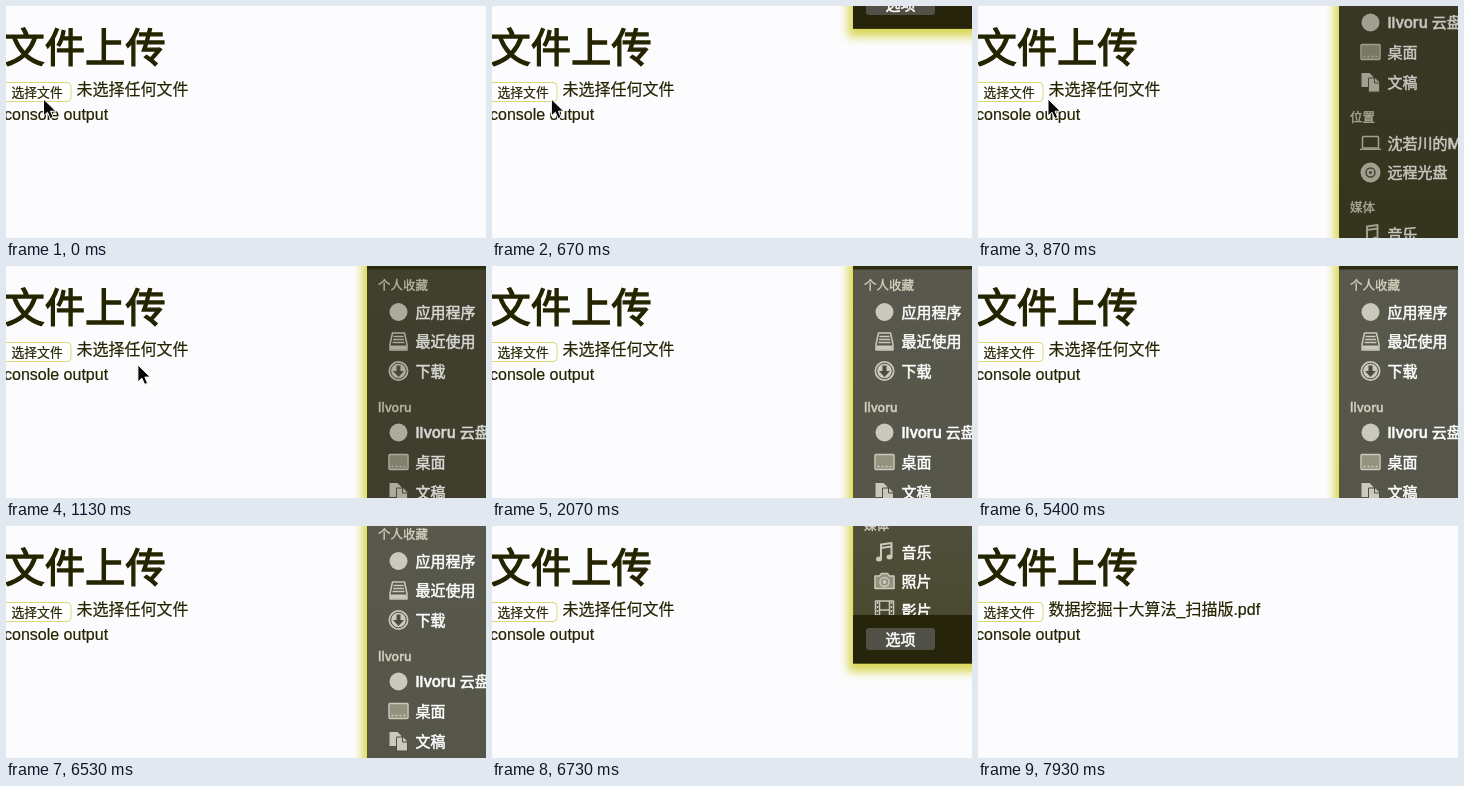
Write an HTML page that moves like this. It is 480 px wide and 232 px high and loops after 8 s.

```html
<!DOCTYPE html>
<html lang="zh-CN">
<head>
<meta charset="utf-8">
<style>
html, body { margin: 0; width: 100%; height: 100%; overflow: hidden; background: #fcfcfe; }
svg { display: block; width: 480px; height: 232px; }
text { font-family: "Liberation Sans", "Noto Sans CJK SC", "Noto Sans CJK", sans-serif; font-size: 16px; fill: #242400; stroke: #242400; stroke-width: .2px; white-space: pre; }
#title { font-size: 40.3px; stroke-width: 1.3px; }
#choose { font-size: 12.8px; }
#panel text { font-family: Inter, "Noto Sans CJK SC", "Noto Sans CJK", sans-serif; font-size: 15px; font-weight: 500; fill: #fff; stroke: #fff; stroke-width: .5px; }
#panel .head { font-size: 12.5px; fill: #d4d4c0; stroke: #d4d4c0; stroke-width: .35px; }
.line { fill: none; stroke: #c9c9bc; stroke-width: 1.5; stroke-linejoin: round; }
.solid { fill: #c9c9bc; }
.soft { fill: #92927e; }
.dark { fill: #4c4c40; }
.cut { fill: none; stroke: #4c4c40; stroke-width: 1.5; }
</style>
</head>
<body>
<svg viewBox="0 0 480 232">
  <defs>
    <filter id="blur" filterUnits="userSpaceOnUse" x="320" y="-60" width="260" height="620">
      <feGaussianBlur stdDeviation="5"/>
    </filter>
    <linearGradient id="shade" x2="0" y2="1">
      <stop stop-color="#58584c"/><stop offset=".5" stop-color="#55554a"/><stop offset="1" stop-color="#48462a"/>
    </linearGradient>
  </defs>
  <rect width="480" height="232" fill="#fcfcfe"/>
  <text id="title" x="-1.5" y="56">文件上传</text>
  <rect x="-4" y="76.5" width="69" height="19" rx="4" fill="#fff" stroke="#d8d878"/>
  <text id="choose" x="5.5" y="91">选择文件</text>
  <text id="file" x="70.5" y="89"></text>
  <text x="-2" y="114">console output</text>

  <g id="panel">
    <rect x="356" y="-10" width="170" height="508" fill="#c4c400" opacity=".65" filter="url(#blur)"/>
    <rect x="361.5" y=".5" width="160" height="489" fill="url(#shade)" stroke="#5c5c18"/>
    <rect id="dim" x="361" width="160" height="490" fill="#25230a"/>
    <g id="rows"></g>
    <rect x="361" width="160" height="3.5" fill="#2c2c10"/>
    <rect x="361" y="441" width="160" height="48" fill="#26240a"/>
    <rect x="374" y="454" width="69" height="22" rx="3" fill="#505046"/>
    <text x="393.5" y="471">选项</text>
  </g>
  <path id="pointer" d="M0 0V17L4 13.3L6.8 19.6L9.7 18.3L7 12.2H12.4Z" fill="#080808" stroke="#fff"/>
</svg>
<script>
const LOOP = 8000, HEIGHT = 489;
const $ = id => document.getElementById(id);

// Each icon is drawn around its own centre.
const icons = {
  disc: '<circle class="solid" r="9"/>',
  tray: '<path class="line" d="M-6-8.5H6L8.5 3V8.5H-8.5V3Z"/><path class="line" d="M-5-5H5M-5.5-2H5.5M-6 1H6"/><path class="solid" d="M-8 4H8V8H-8Z"/>',
  down: '<circle class="solid" r="10"/><circle class="cut" r="7.8" style="stroke-width:1"/><path class="dark" d="M-2-5.5H2V0H5.5L0 6L-5.5 0H-2Z"/>',
  desk: '<rect class="soft" x="-9" y="-7" width="18" height="14"/><rect class="line" x="-9.5" y="-7.5" width="19" height="15" rx="1"/><path class="line" d="M-7 4.5H7" stroke-dasharray="2 2"/>',
  docs: '<path class="solid" d="M-9-9H-1L3-5V5H-9Z"/><path class="solid" d="M-2-4H5L9 0V10H-2Z" stroke="#4c4c40"/><path class="cut" d="M4-4V1H9" style="stroke-width:1"/>',
  laptop: '<rect class="line" x="-8" y="-6.5" width="16" height="11.5" rx="1"/><path class="solid" d="M-10.5 5.5H10.5V7H-10.5Z"/>',
  cd: '<circle class="solid" r="10"/><circle class="cut" r="4.5"/><circle class="dark" r="1.6"/>',
  note: '<path class="line" d="M-3.5 7V-7.5L7-9V5M-3.5-4L7-5.5" style="stroke-width:2"/><ellipse class="solid" cx="-5.5" cy="7" rx="3" ry="2.5"/><ellipse class="solid" cx="5" cy="5" rx="3" ry="2.5"/>',
  camera: '<path class="soft" d="M-10-5H-5L-3-8H3L5-5H10V8H-10Z"/><path class="line" d="M-9.5-5H-5L-3-7.5H3L5-5H9.5V7.5H-9.5Z"/><circle class="line" cy="1" r="4.5"/><circle class="solid" cy="1" r="2"/>',
  film: '<rect class="line" x="-9" y="-9" width="18" height="18"/><path class="line" d="M-5-9V9M5-9V9M-5 0H5"/><path class="line" d="M-7-8V9M7-8V9" stroke-dasharray="2 2"/>'
};
const rows = [
  [19, '个人收藏'], [46, '应用程序', 'disc'], [75.5, '最近使用', 'tray'], [105, '下载', 'down'],
  [141, 'Ilvoru'], [166.5, 'Ilvoru 云盘', 'disc'], [196, '桌面', 'desk'], [226, '文稿', 'docs'],
  [261, '位置'], [287, '沈若川的M', 'laptop'], [316.5, '远程光盘', 'cd'],
  [351.5, '媒体'], [378, '音乐', 'note'], [407, '照片', 'camera'], [436, '影片', 'film']
];
$('rows').innerHTML = rows.map(([y, label, icon]) => icon
  ? `<g transform="translate(392.5 ${y})">${icons[icon]}</g><text x="409.5" y="${y + 5.5}">${label}</text>`
  : `<text class="head" x="372" y="${y + 4.5}">${label}</text>`).join('');

const ramp = (t, from, to) => Math.min(1, Math.max(0, (t - from) / (to - from)));
const smooth = p => p * p * (3 - 2 * p);

function draw(t) {
  const shown = smooth(ramp(t, 620, 1017)) - smooth(ramp(t, 6500, 6855));
  $('panel').setAttribute('transform', `translate(0 ${Math.round((shown - 1) * HEIGHT)})`);
  $('panel').style.display = shown > 0 ? '' : 'none';

  // The sheet starts out dimmed and brightens once it has focus.
  const bright = ramp(t, 870, 1900);
  $('dim').setAttribute('opacity', 0.6 * (1 - bright));
  $('rows').setAttribute('opacity', 0.72 + 0.28 * bright);

  const leave = ramp(t, 870, 1550) ** 2;
  const x = 37.5 + 32.5 * smooth(ramp(t, 350, 870)) + 420 * leave;
  $('pointer').setAttribute('transform', `translate(${x} ${93 + 40 * leave})`);
  $('pointer').style.display = leave < 1 ? '' : 'none';

  $('file').textContent = t < 7050 ? '未选择任何文件' : '数据挖掘十大算法_扫描版.pdf';
}

const start = performance.now();
function tick() {
  draw((performance.now() - start) % LOOP);
  requestAnimationFrame(tick);
}
draw(0);
tick();
</script>
</body>
</html>
```
